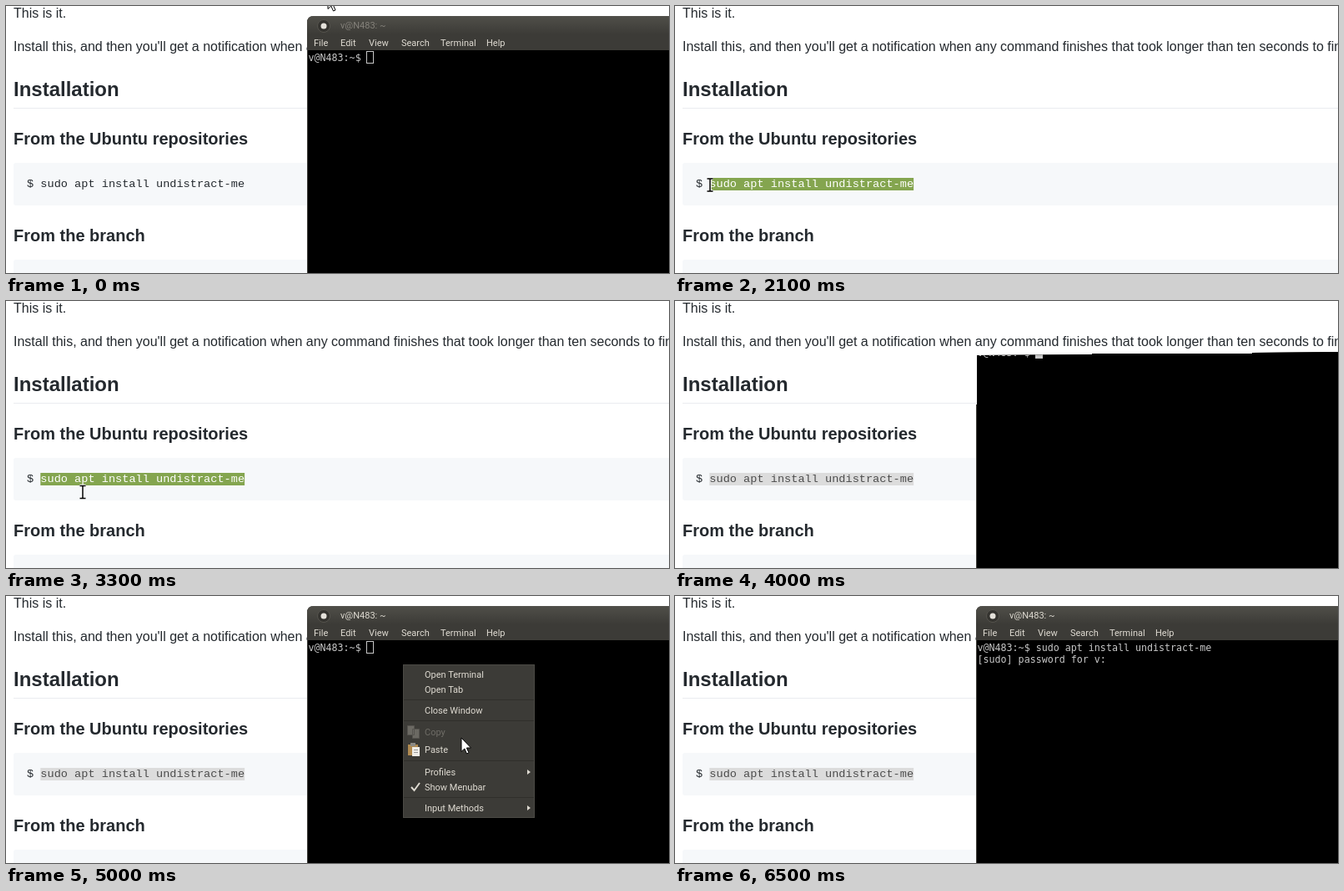
Animation of 795 by 320 pixels, one loop 8000 ms. Source, as an HTML page:

```html
<!DOCTYPE html>
<html lang="en">
<head>
<meta charset="utf-8">
<title>Install from the page</title>
<style>
html, body { margin: 0; width: 100%; height: 100%; overflow: hidden; background: #fff; }
svg { display: block; width: 795px; height: 320px; }
text { white-space: pre; }
.page { font: 16px "Liberation Sans", Arial, sans-serif; fill: #24292e; }
.page .h2 { font-size: 24px; font-weight: bold; }
.page .h3 { font-size: 20px; font-weight: bold; }
.page .code { font: 13.6px "Liberation Mono", monospace; }
.browser-menu { font: 14.6px "Noto Sans", sans-serif; fill: #dfdbd2; }
.ui { font: 11px Roboto, sans-serif; fill: #dfdbd2; }
.shell { font: 11.66px "DejaVu Sans Mono", monospace; fill: #c8c8c8; }
.line { stroke: #302f2b; }
</style>
</head>
<body>
<svg viewBox="0 0 795 320">
  <defs>
    <linearGradient id="green" x2="0" y2="1">
      <stop stop-color="#8fb15a"/><stop offset="1" stop-color="#6f9243"/>
    </linearGradient>
    <linearGradient id="bar" x2="0" y2="1">
      <stop stop-color="#504f49"/><stop offset="1" stop-color="#3c3b37"/>
    </linearGradient>
    <filter id="shadow" x="-10%" y="-10%" width="120%" height="130%">
      <feDropShadow dx="2" dy="3" stdDeviation="4" flood-opacity=".35"/>
    </filter>
    <clipPath id="opening">
      <path d="M362 65L500 64V63H692V62L795 61V320H361V124H362Z"/>
    </clipPath>
  </defs>

  <g class="page">
    <text x="9" y="14">This is it.</text>
    <text x="9" y="54">Install this, and then you'll get a notification when any command finishes that took longer than ten seconds to finish.</text>
    <text class="h2" x="9" y="108">Installation</text>
    <path d="M9 122.5H795" stroke="#eaecef"/>
    <text class="h3" x="9" y="166">From the Ubuntu repositories</text>
    <rect x="9" y="188" width="800" height="51" rx="3" fill="#f6f8fa"/>
    <rect id="selection" y="206" height="15"/>
    <text class="code" x="25" y="217"><tspan id="plain"></tspan><tspan id="picked"></tspan></text>
    <text class="h3" x="9" y="282">From the branch</text>
    <rect x="9" y="304" width="800" height="51" rx="3" fill="#f6f8fa"/>
  </g>

  <g id="browserMenu" class="browser-menu">
    <rect x="41" y="213" width="501" height="150" fill="#403f3a" filter="url(#shadow)"/>
    <path d="M41.5 330V213.5H541.5V330" fill="none" stroke="#33322e"/>
    <rect id="copyHover" x="42" y="217" width="499" height="23" fill="url(#green)"/>
    <text x="78" y="234">Copy</text>
    <text x="475" y="234">Ctrl+C</text>
    <text x="78" y="258">Search Quvelo for “sudo apt install undistract-me”</text>
    <text x="78" y="282">Print…</text>
    <text x="475" y="282" fill="#8a8780">Ctrl+P</text>
    <path class="line" d="M42 292.5H541"/>
    <circle cx="60" cy="311" r="6.5" fill="#860d0d"/>
    <text x="78" y="317">Block element</text>
  </g>

  <g id="terminal">
    <path d="M361 400V20Q361 12 369 12H923Q931 12 931 20V400Z" fill="#3c3b37"/>
    <path d="M361 34V20Q361 12 369 12H923Q931 12 931 20V34Z" fill="url(#bar)"/>
    <rect x="362" y="53" width="568" height="346"/>
    <circle cx="381" cy="24" r="7.5" fill="#34332f" stroke="#56544e"/>
    <circle cx="381" cy="24" r="3.5" fill="#e4e1da"/>
    <g class="ui">
      <text id="title" x="401" y="27">v@N483: ~</text>
      <text x="369" y="48">File</text>
      <text x="401" y="48">Edit</text>
      <text x="435" y="48">View</text>
      <text x="474" y="48">Search</text>
      <text x="521" y="48">Terminal</text>
      <text x="576" y="48">Help</text>
    </g>
    <g class="shell">
      <text id="prompt" x="362.5" y="66"></text>
      <text id="password" x="362.5" y="80">[sudo] password for v:</text>
      <rect id="caret" width="8" height="14" stroke="#c8c8c8"/>
    </g>
  </g>

  <g id="shellMenu" class="ui">
    <rect x="476.5" y="82.5" width="157" height="183" fill="#3c3b37" stroke="#4b4a45"/>
    <path class="line" d="M477 124.5H633M477 149.5H633M477 197.5H633M477 241.5H633"/>
    <rect id="rowHover" x="477" width="156" fill="url(#green)"/>
    <g id="rows"></g>
    <path d="M625 208l4 3-4 3ZM625 251l4 3-4 3Z"/>
    <path d="M486 229l3.500 4 6.500-9" fill="none" stroke="#dfdbd2" stroke-width="2"/>
    <path d="M481.500 155.500h8v11h-8ZM487.500 159.500h8v11h-8Z" fill="#6b6963" stroke="#55534e"/>
    <path d="M482 178h12v13h-12Z" fill="#b08a50"/>
    <path d="M485 176h6v4h-6Z" fill="#8c8a84"/>
    <path d="M487 181h9v11h-9Z" fill="#efede8"/>
    <path d="M489 184.500h5M489 187.500h5" stroke="#999"/>
  </g>

  <path id="arrow" d="M0 0V16.500L3.800 13 6.500 19 9 17.900 6.400 12H11.500Z" fill="#fff" stroke="#000"/>
  <g id="beam" fill="none">
    <path d="M-3.500 -7.500H3.500M-3.500 7.500H3.500M0 -7.500V7.500" stroke="#fff" stroke-width="3.500"/>
    <path d="M-3.500 -7.500H3.500M-3.500 7.500H3.500M0 -7.500V7.500" stroke="#000" stroke-width="1.500"/>
  </g>
</svg>
<script>
const $ = id => document.getElementById(id);
const LOOP = 8000, TICK = 100;
const COMMAND = "sudo apt install undistract-me", LINE = "$ " + COMMAND;
const CODE_CHAR = 8.16, SHELL_CHAR = 7.02;

// time, x, y
const pointerPath = [
  [0, 386, -13], [500, 289, 215], [600, 287, 215], [700, 276, 215], [800, 247, 216],
  [900, 208, 216], [1000, 100, 216], [1100, 30, 216], [1300, 30, 216], [1700, 4, 217],
  [2100, 42, 214.5], [2500, 42, 214.5], [2800, 92, 229], [4200, 92, 229],
  [4300, 500, 110], [4500, 476, 82], [4600, 476, 82], [5000, 546, 170], [5100, 547, 173]
];
// time, first selected character
const selectionSteps = [[0, 32], [700, 31], [800, 29], [900, 27], [1000, 12], [1100, 0], [2000, 1], [2100, 2]];
// label, middle, half height
const menuRows = [
  ["Open Terminal", 94, 9], ["Open Tab", 112, 9], ["Close Window", 137, 9], ["Copy", 163, 0],
  ["Paste", 184, 11], ["Profiles", 211, 9], ["Show Menubar", 229, 9], ["Input Methods", 254, 9]
];

$("rows").innerHTML = menuRows.map(([label, y, half]) =>
  `<text x="502" y="${y + 4}" ${half ? "" : 'fill="#6f6d67"'}>${label}</text>`).join("");

const set = (id, attrs) => {
  for (const name in attrs) $(id).setAttribute(name, attrs[name]);
};
const show = (id, visible) => { $(id).style.display = visible ? "" : "none"; };

function pointerAt(t) {
  const next = pointerPath.findIndex(key => key[0] > t);
  if (next < 0) return pointerPath.at(-1).slice(1);
  const [t0, x0, y0] = pointerPath[next - 1], [t1, x1, y1] = pointerPath[next];
  const k = (t - t0) / (t1 - t0);
  return [x0 + (x1 - x0) * k, y0 + (y1 - y0) * k];
}

function drawSelection(t) {
  const start = selectionSteps.findLast(step => step[0] <= t)[1];
  const focused = t < 4000;
  $("plain").textContent = LINE.slice(0, start);
  $("picked").textContent = LINE.slice(start);
  set("picked", { fill: focused ? "#fff" : "#4c4c4c" });
  set("selection", {
    x: 25 + start * CODE_CHAR,
    width: (LINE.length - start) * CODE_CHAR,
    fill: focused ? "#84a54f" : "#dcdcdc"
  });
}

function drawTerminal(t, menuOpen) {
  const pasted = t >= 5300, entered = t >= 5900;
  show("terminal", t < 200 || t >= 4000);
  set("terminal", {
    transform: t === 100 ? "scale(.6)" : "",
    opacity: t === 100 ? 0.6 : 1,
    "clip-path": t === 4000 ? "url(#opening)" : "none"
  });
  set("title", { fill: t < 4100 ? "#85827b" : "#dfdbd2" });
  $("prompt").textContent = "v@N483:~$ " + (pasted ? COMMAND : "");
  show("password", entered);
  show("caret", t < 6500);
  const column = entered ? 23 : pasted ? 40 : 10;
  set("caret", {
    x: Math.round(362 + column * SHELL_CHAR) + 0.5,
    y: entered ? 68.5 : 54.5,
    fill: t >= 4000 && !menuOpen ? "#c8c8c8" : "#000"
  });
}

function drawPointer(t, x, y) {
  const visible = t < 4000 || (t >= 4300 && t < 5900);
  const overText = (t >= 500 && t < 2500) || (t >= 3100 && t < 4300);
  show("arrow", visible && !overText);
  show("beam", visible && overText);
  set(overText ? "beam" : "arrow", { transform: `translate(${x} ${y})` });
}

function draw(t) {
  const [x, y] = pointerAt(t);
  drawSelection(t);

  show("browserMenu", t >= 2500 && t < 3300);
  set("browserMenu", { opacity: t < 3100 ? 1 : (3300 - t) / 300 });
  show("copyHover", y >= 217);

  const menuOpen = t >= 4600 && t < 5200;
  drawTerminal(t, menuOpen);
  show("shellMenu", t >= 4600 && t < 5300);
  set("shellMenu", { opacity: menuOpen ? 1 : 0.5 });
  const row = menuRows.find(([, middle, half]) => Math.abs(y - middle) <= half);
  show("rowHover", row);
  if (row) set("rowHover", { y: row[1] - row[2], height: 2 * row[2] });

  drawPointer(t, x, y);
}

function frame() {
  draw(Math.floor(performance.now() % LOOP / TICK) * TICK);
  requestAnimationFrame(frame);
}
frame();
</script>
</body>
</html>
```
